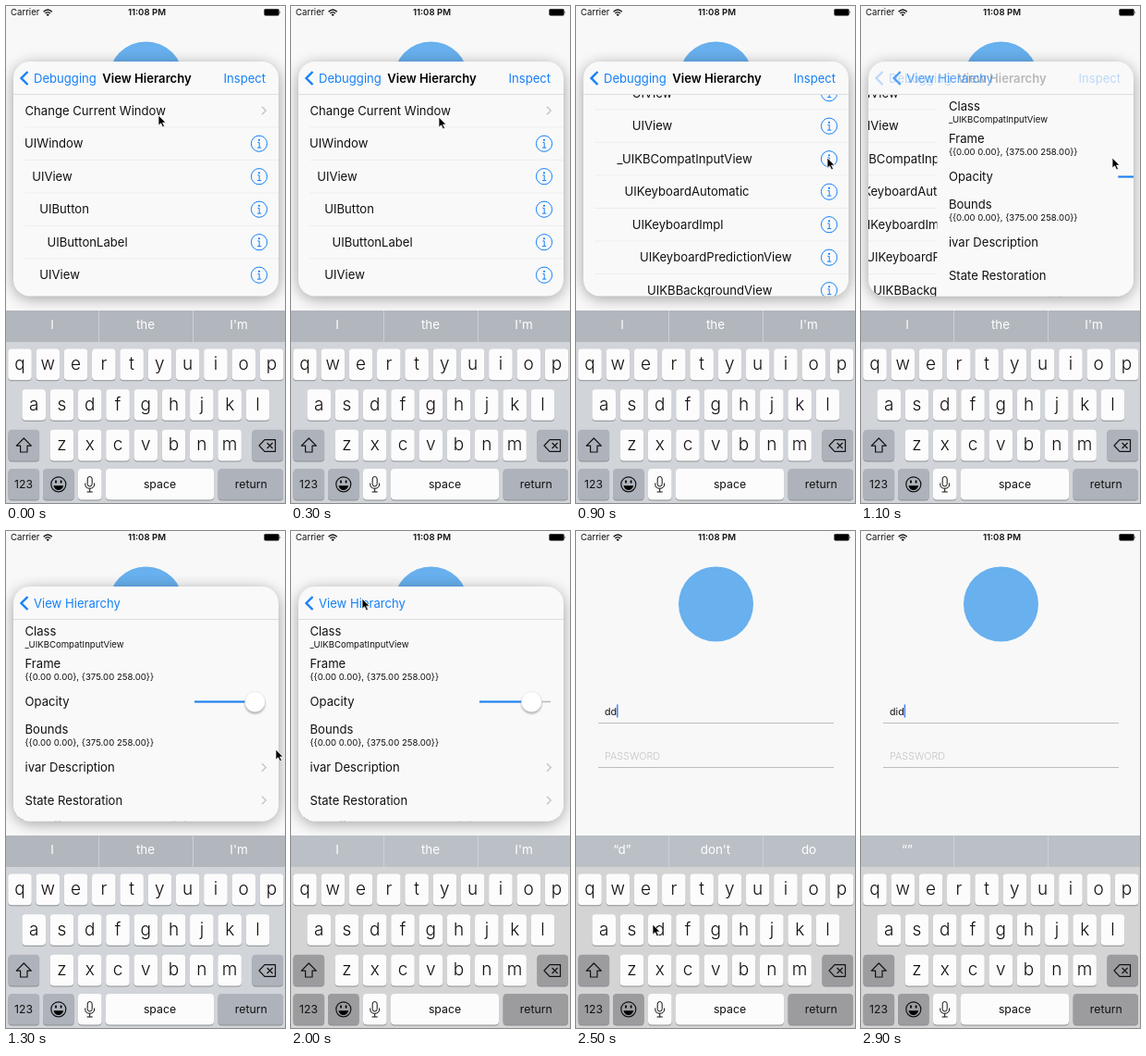
Write an HTML page that moves like this. It is 302x537 px and loops after 3000 ms.

```html
<!DOCTYPE html>
<html lang="en">
<head>
<meta charset="utf-8">
<title>View inspector</title>
<style>
  html, body { margin: 0; width: 100%; height: 100%; overflow: hidden; background: #f8f8f8; }
  svg { display: block; width: 100vw; height: 100vh; font-family: Inter, Roboto, sans-serif; }
  text { white-space: pre; }
</style>
</head>
<body>
<svg id="stage" viewBox="0 0 302 537" xmlns="http://www.w3.org/2000/svg">
  <defs>
    <clipPath id="card"><rect x="8" y="60" width="287" height="253.5" rx="18"/></clipPath>
    <clipPath id="body"><rect x="8" y="96" width="287" height="218"/></clipPath>
    <filter id="blur" x="-20%" y="-20%" width="140%" height="140%"><feGaussianBlur stdDeviation="8"/></filter>
    <filter id="soft" x="-50%" y="-50%" width="200%" height="200%"><feGaussianBlur stdDeviation="1.2"/></filter>
  </defs>
  <rect width="302" height="537" fill="#f8f8f8"/>
  <g id="status"></g>
  <g id="login"></g>
  <g id="popup">
    <rect x="8" y="63" width="287" height="253" rx="20" fill="#000" opacity=".36" filter="url(#blur)"/>
    <g clip-path="url(#card)">
      <rect x="8" y="60" width="287" height="254" fill="#f9f9f9"/>
      <g clip-path="url(#body)">
        <g id="listPage">
          <g id="listA"></g>
          <g id="listB"></g>
        </g>
        <g id="detail"></g>
      </g>
      <path d="M8 95.5H295" stroke="#d6d6d8" stroke-width=".8"/>
      <g id="headList"></g>
      <g id="headDetail"></g>
    </g>
  </g>
  <g id="keyboard"></g>
  <path id="cursor" d="M0 0V11.2L2.6 8.8L4.6 13L6.5 12.1L4.6 8.1H8Z" fill="#000" stroke="#fff" stroke-width=".8"/>
</svg>
<script>
const LOOP = 3000, STEP = 100;
const BLUE = '#1580f8', INK = '#111', ROW = 35.5;
const $ = id => document.getElementById(id);

const text = (x, y, str, size = 13.1, fill = INK, extra = '') =>
  `<text x="${x}" y="${y}" font-size="${size}" fill="${fill}" ${extra}>${str}</text>`;
const mid = (x, y, str, size, fill, extra = '') =>
  text(x, y, str, size, fill, `text-anchor="middle" ${extra}`);
const line = (d, stroke, width = 1, extra = '') =>
  `<path d="${d}" fill="none" stroke="${stroke}" stroke-width="${width}" ${extra}/>`;
const chevron = y => line(`M277 ${y - 4.3}l4.3 4.3l-4.3 4.3`, '#c2c2c7', 1.3);
const info = y =>
  `<circle cx="274" cy="${y}" r="8.6" fill="none" stroke="${BLUE}"/>
   <circle cx="274" cy="${y - 3.9}" r="1.1" fill="${BLUE}"/>` +
  line(`M272.4 ${y - 1.3}H274.2V${y + 4.4}M272 ${y + 4.4}H276.3`, BLUE);
const back = label =>
  line('M23.5 71L16.5 78L23.5 85', BLUE, 2.4) + text(30, 82.7, label, 13.1, BLUE);

// Status bar and login form
$('status').innerHTML =
  text(5, 10.4, 'Carrier', 9.6) +
  line('M40.6 6.2Q45.2 1.6 49.8 6.2M42.4 8Q45.2 5.2 48 8', INK, 1.4) +
  '<path d="M43.6 9.2Q45.2 7.8 46.8 9.2L45.2 11Z"/>' +
  mid(152.5, 10.4, '11:08 PM', 9.6, INK, 'font-weight="600"') +
  '<rect x="279.4" y="3.2" width="16.2" height="7.2" rx="1.4" fill="#000"/>' +
  '<path d="M296.4 5.4q1.3 1.4 0 2.8z"/>';

$('login').innerHTML =
  '<circle cx="151.5" cy="79" r="40.5" fill="#68b0ee"/>' +
  text(31, 199, '', 10.7, INK, 'id="user"') +
  '<rect id="caret" y="187.5" width="1.4" height="14" fill="#3a78f0"/>' +
  text(31, 247, 'PASSWORD', 10.8, '#c4c4c8', 'font-weight="300"') +
  line('M24 207.5H279M24 255.5H279', '#bdbdc0');

// Hierarchy lists: [depth, class name]
const rows = items =>
  text(20.5, 118, 'Change Current Window') + chevron(113) +
  items.map(([depth, name], i) => {
    const y = 113.2 + ROW * (i + 1);
    return line(`M20 ${y - ROW / 2}H295`, '#ededef', .8) +
      text(20 + depth * 8.15, y + 4.7, name) + info(y);
  }).join('');

$('listA').innerHTML = rows([
  [0, 'UIWindow'], [1, 'UIView'], [2, 'UIButton'], [3, 'UIButtonLabel'], [2, 'UIView']
]);
$('listB').innerHTML = rows([
  [0, 'UIRemoteKeyboardWindow'], [1, 'UIInputSetContainerView'], [2, 'UIInputSetHostView'],
  [3, 'UIKBInputBackdropView'], [4, 'UIKBBackdropView'], [5, 'UIView'], [5, 'UIView'],
  [3, '_UIKBCompatInputView'], [4, 'UIKeyboardAutomatic'], [5, 'UIKeyboardImpl'],
  [6, 'UIKeyboardPredictionView'], [7, 'UIKBBackgroundView']
]);

const rect = '{{0.00 0.00}, {375.00 258.00}}';
const field = (y, name, value) => text(20.5, y, name) + text(20.5, y + 12.9, value, 9.6);
$('detail').innerHTML =
  '<rect x="8" y="96" width="287" height="218" fill="#f9f9f9"/>' +
  field(112.6, 'Class', '_UIKBCompatInputView') +
  field(148, 'Frame', rect) +
  text(20.5, 189.2, 'Opacity') +
  line('M204 184.5H281', '#b9b9bc', 1.7) +
  line('', BLUE, 1.9, 'id="fill"') +
  `<g id="knob"><circle cy="2" r="11" fill="#000" opacity=".3" filter="url(#soft)"/>
   <circle r="11" fill="#fff" stroke="#d8d8da" stroke-width=".5"/></g>` +
  field(219, 'Bounds', rect) +
  text(20.5, 260.2, 'ivar Description') + chevron(255.5) +
  text(20.5, 295.8, 'State Restoration') + chevron(291);

$('headList').innerHTML = back('Debugging') +
  mid(152.5, 82.7, 'View Hierarchy', 13.1, '#000', 'font-weight="600"') +
  text(235.5, 82.7, 'Inspect', 13.1, BLUE);
$('headDetail').innerHTML = back('View Hierarchy');

// Keyboard
const key = (x, y, w, special) =>
  `<rect x="${x}" y="${y + 1}" width="${w}" height="33.6" rx="4" fill="#8c8e92"/>
   <rect x="${x}" y="${y}" width="${w}" height="33.6" rx="4" fill="#fcfcfc" ${special ? 'class="special"' : ''}/>`;
const letters = (str, x0, y) => [...str].map((c, i) => {
  const x = x0 + i * 30.28;
  return key(x - 12.8, y, 25.6) + mid(x, y + 22.4, c, 19, INK, 'font-weight="300"');
}).join('');
const face =
  `<circle cx="56.8" cy="516.8" r="8" fill="none" stroke="${INK}" stroke-width="1.2"/>
   <ellipse cx="54" cy="514" rx="1" ry="1.7"/><ellipse cx="59.6" cy="514" rx="1" ry="1.7"/>
   <path d="M51.4 518.2H62.2Q61 523 56.8 523T51.4 518.2Z"/>`;
const mic =
  `<rect x="88.2" y="508.5" width="5" height="10.5" rx="2.5" fill="none" stroke="${INK}"/>` +
  line('M85.8 515.5V517Q86 521.3 90.7 521.3T95.6 517V515.5M90.7 521.3V525M87.6 525H93.8', INK);

$('keyboard').innerHTML =
  '<rect id="base" y="329" width="302" height="208"/>' +
  '<rect id="bar" y="329" width="302" height="34"/>' +
  line('M100.5 329V363M202.5 329V363', '#cdd0d6') +
  [50, 151, 252].map(x => mid(x, 349.2, '', 13.4, '#fff', 'class="hint"')).join('') +
  '<g id="keys">' +
  letters('qwertyuiop', 15, 370.6) + letters('asdfghjkl', 30.2, 414.2) + letters('zxcvbnm', 60.4, 457.8) +
  key(2.5, 457.8, 33.6, 1) + line('M19.3 467L27.3 475.2H23V482H15.6V475.2H11.3Z', INK, 1.2, 'stroke-linejoin="round"') +
  key(266.4, 457.8, 33.6, 1) +
  line('M274 475L280 468.7H291.5V481.3H280ZM282.6 472L288.6 478M288.6 472L282.6 478', INK, 1.2, 'stroke-linejoin="round"') +
  key(2.5, 500, 33.6, 1) + mid(19, 521.4, '123', 12.2, INK) +
  key(40, 500, 33.6, 1) + face +
  key(78, 500, 25.6) + mic +
  key(108, 500, 117, 0) + mid(166.5, 521, 'space', 12.3, INK) +
  key(229.6, 500, 70.4, 1) + mid(265.3, 521, 'return', 12.3, INK) +
  '</g>';

const specials = document.querySelectorAll('.special');
const hints = document.querySelectorAll('.hint');

const clamp = v => Math.min(1, Math.max(0, v));
const ease = v => v * v * (3 - 2 * v);
const span = (t, a, b) => ease(clamp((t - a) / (b - a)));
const mix = (a, b, k) => `rgb(${a.map((v, i) => Math.round(v + (b[i] - v) * k))})`;

// Eased interpolation through [time, ...values] stops
function along(stops, t) {
  const i = stops.findIndex(s => s[0] > t);
  if (i < 0) return stops[stops.length - 1].slice(1);
  const a = stops[i - 1], b = stops[i], k = span(t, a[0], b[0]);
  return a.slice(1).map((v, n) => v + (b[n + 1] - v) * k);
}

const pointer = [
  [0, 165, 118], [100, 165, 118], [300, 160, 120], [500, 53, 72], [900, 272, 164],
  [1100, 272, 164], [1300, 292, 236], [1400, 271, 186], [1600, 238, 187], [1800, 260.5, 186],
  [2000, 77, 73], [2200, 77, 73], [2400, 83, 425], [2500, 83, 425], [2700, 165, 513]
];
const slider = [[0, 269.5], [1400, 269.5], [1600, 237], [1800, 260.3]];

function draw(t) {
  const push = span(t, 900, 1200) * (1 - span(t, 2000, 2200));
  const shown = 1 - span(t, 2200, 2400);
  $('popup').setAttribute('opacity', shown);
  $('listA').setAttribute('display', t < 400 ? 'inline' : 'none');
  $('listB').setAttribute('display', t < 400 ? 'none' : 'inline');
  $('listB').setAttribute('transform', `translate(0 ${-232 * span(t, 500, 850)})`);
  $('listPage').setAttribute('transform', `translate(${-86 * push} 0)`);
  $('detail').setAttribute('transform', `translate(${287 * (1 - push)} 0)`);
  $('headList').setAttribute('opacity', 1 - push);
  $('headDetail').setAttribute('opacity', push);
  $('headDetail').setAttribute('transform', `translate(${74 * (1 - push)} 0)`);

  const [knob] = along(slider, t);
  $('knob').setAttribute('transform', `translate(${knob} 184.5)`);
  $('fill').setAttribute('d', `M204 184.5H${knob}`);

  const alpha = (knob - 215) / 54.5;
  const dim = clamp((1 - alpha) / .169);
  $('keys').setAttribute('opacity', Math.min(1, alpha / .83));
  $('base').setAttribute('fill', mix([209, 212, 217], [212, 212, 213], dim));
  $('bar').setAttribute('fill', mix([178, 182, 189], [187, 192, 199], dim));
  specials.forEach(s => s.setAttribute('fill', mix([174, 179, 187], [156, 156, 159], dim)));

  const words = t < 2400 ? ['I', 'the', "I'm"] : t < 2700 ? ['“d”', "don't", 'do'] : ['“”', '', ''];
  hints.forEach((h, i) => h.textContent = words[i]);

  const typed = t < 2400 ? '' : t < 2500 ? 'd' : t < 2700 ? 'dd' : 'did';
  $('user').textContent = typed;
  $('caret').setAttribute('x', 31 + (typed ? $('user').getComputedTextLength() : 0));
  $('caret').setAttribute('display', shown < .5 ? 'inline' : 'none');

  const [x, y] = along(pointer, t);
  $('cursor').setAttribute('transform', `translate(${x} ${y})`);
  $('cursor').setAttribute('display', t < 2800 ? 'inline' : 'none');
}

const start = performance.now();
function tick(now) {
  const t = Math.max(0, now - start) % LOOP;
  draw(Math.floor(t / STEP) * STEP);
  requestAnimationFrame(tick);
}
draw(0);
requestAnimationFrame(tick);
</script>
</body>
</html>
```
